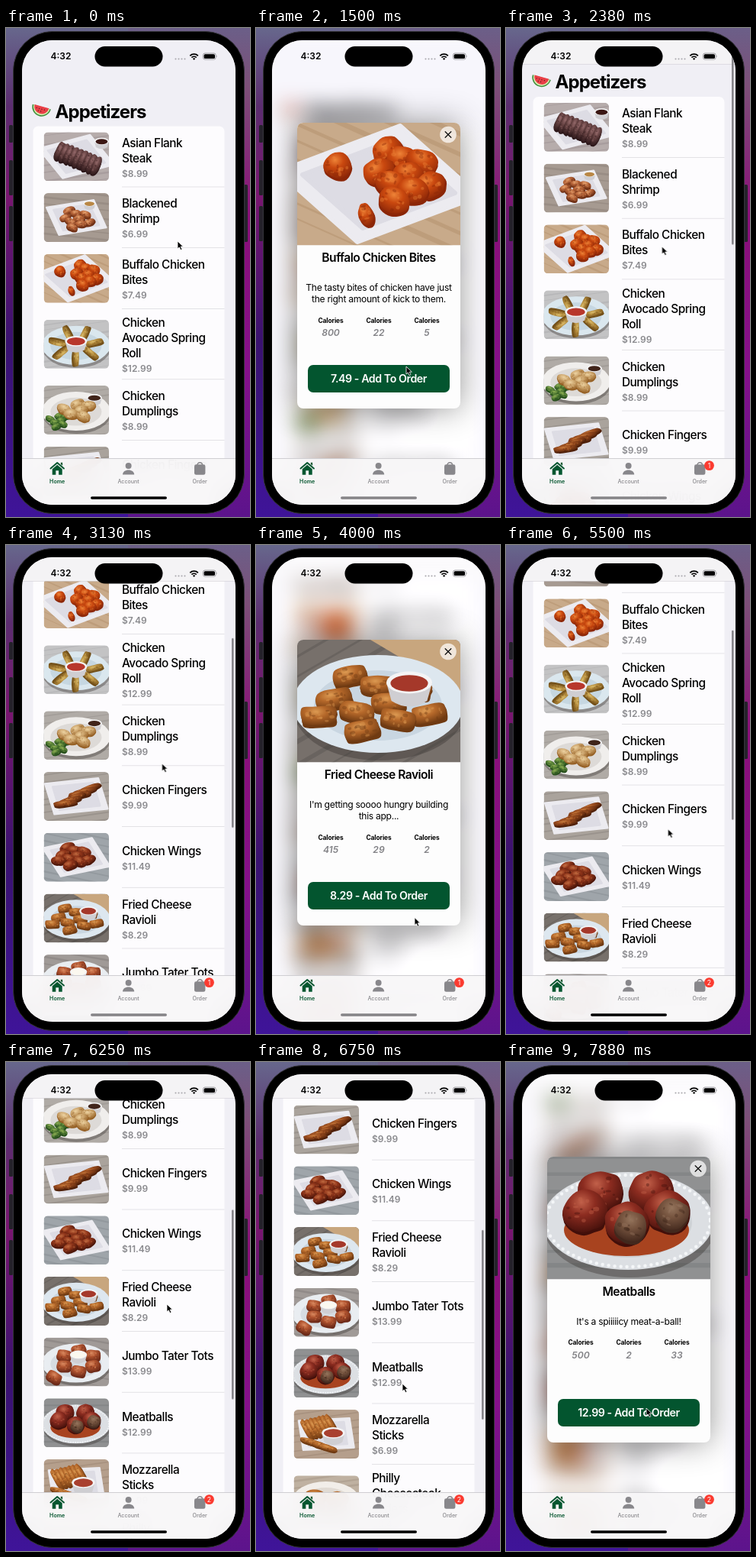
Write an HTML page that moves like this. It is 320 by 640 pixels and loops after 8000 ms.

```html
<!DOCTYPE html>
<html lang="en">
<head>
<meta charset="utf-8">
<title>Appetizers</title>
<style>
  @property --s { syntax: "<number>"; inherits: true; initial-value: 0; }
  html, body { margin: 0; width: 100%; height: 100%; overflow: hidden; }
  body {
    position: relative; font-family: Inter, Roboto, sans-serif; font-optical-sizing: none;
    background:
      linear-gradient(#67678c, #5c2d70 16%, #7a1670 34%, #3a1270 64%, #3f1499) 0 0 / 50% 100% no-repeat,
      linear-gradient(#6b5f88, #7d4f78 12%, #8a0f78 38%, #85108a 70%, #5c148c) 100% 0 / 50% 100% no-repeat;
  }
  svg { position: absolute; left: 0; top: 0; width: 320px; height: 640px; overflow: hidden; }
  .body { position: absolute; box-sizing: border-box; left: 8.5px; top: 3.5px; width: 304px; height: 632.5px;
    border-radius: 52px; background: #000; border: 1.5px solid #38373d; }
  .key { position: absolute; left: 4px; width: 5px; background: #25222b; border-radius: 1.5px; }
  .screen { position: absolute; left: 20.5px; top: 15.5px; width: 280.5px; height: 608px;
    border-radius: 40px; overflow: hidden; background: #f6f5f8; }
  .screen svg { left: -20.5px; top: -15.5px; }
  .tabs { position: absolute; left: 0; top: 547.5px; width: 100%; height: 61px;
    box-sizing: border-box; border-top: .7px solid #cfced2;
    background: rgba(248, 247, 248, .94); backdrop-filter: blur(14px); }

  .title { font-weight: 700; font-size: 24px; letter-spacing: -.04em; }
  .name { font-weight: 500; font-size: 15.4px; letter-spacing: -.033em; }
  .price { font-weight: 600; font-size: 12px; fill: #8a8a8e; }
  .mid, .tab, .count { text-anchor: middle; }
  .head { font-weight: 600; font-size: 15.6px; letter-spacing: -.034em; }
  .desc { font-size: 12.1px; letter-spacing: -.025em; }
  .label { font-weight: 700; font-size: 8.4px; letter-spacing: -.01em; }
  .value { font-weight: 600; font-size: 12.1px; font-style: italic; fill: #828286; }
  .add { font-weight: 600; font-size: 14.2px; letter-spacing: -.03em; fill: #fff; }
  .clock { font-weight: 600; font-size: 12px; }
  .tab { font-weight: 500; font-size: 7.1px; }
  .count { font-size: 8.6px; fill: #fff; }

  .home { animation: scroll 8s infinite, blur 8s step-end infinite; }
  .scroll { transform: translateY(calc(var(--s) * -1px)); }
  .nav { opacity: calc(var(--s) / 20); }
  .thumb { transform: translateY(calc(var(--s) * .4075px)); animation: thumb 8s infinite; }
  .card { opacity: 0; animation: 8s step-end infinite; }
  .card:nth-of-type(1) { animation-name: first; }
  .card:nth-of-type(2) { animation-name: second; }
  .card:nth-of-type(3) { animation-name: third; }
  .sheet { filter: drop-shadow(0 0 21px rgba(0, 0, 0, .42)); }
  .badge { animation: badge 8s step-end infinite; }
  .one { animation: one 8s step-end infinite; }
  .two { animation: two 8s step-end infinite; }
  .grip { animation: grip 8s step-end infinite; }
  .cursor { animation: cursor 8s ease-in-out infinite; }

  @keyframes scroll {
    0%, 27.5% { --s: 0; animation-timing-function: cubic-bezier(.3, 0, .4, 1); }
    39%, 41% { --s: 250.7; }
    46%, 67.5% { --s: 218; animation-timing-function: cubic-bezier(.3, 0, .7, .8); }
    78.125% { --s: 426; animation-timing-function: cubic-bezier(.2, .3, .5, 1); }
    84.375% { --s: 491.2; }
    87.5%, 100% { --s: 467; }
  }
  @keyframes blur {
    0%, 23.4375%, 65.625% { filter: none; }
    9.375%, 48.4375%, 87.5% { filter: blur(14px) brightness(1.03); }
  }
  @keyframes thumb {
    0%, 27.5%, 48.4%, 67.5%, 87.5%, 100% { opacity: 0; }
    28.5%, 46%, 68.5%, 86.5% { opacity: 1; }
  }
  @keyframes first { 0%, 23.4375% { opacity: 0; } 9.375% { opacity: 1; } }
  @keyframes second { 0%, 65.625% { opacity: 0; } 48.4375% { opacity: 1; } }
  @keyframes third { 0% { opacity: 0; } 87.5%, 100% { opacity: 1; } }
  @keyframes badge { 0% { opacity: 0; } 23.4375%, 100% { opacity: 1; } }
  @keyframes one { 0% { opacity: 1; } 65.625%, 100% { opacity: 0; } }
  @keyframes two { 0% { opacity: 0; } 65.625%, 100% { opacity: 1; } }
  @keyframes grip { 0%, 67.5%, 100% { fill: #000; } 9.375% { fill: #858487; } }
  @keyframes cursor {
    0% { transform: translate(225px, 279px); }
    6.5%, 9.375% { transform: translate(222px, 322px); }
    17.5%, 23.4375% { transform: translate(197px, 443px); }
    29%, 39.1% { transform: translate(204.5px, 286px); }
    46%, 48.4375% { transform: translate(207px, 490px); }
    55%, 65.625% { transform: translate(215px, 470px); }
    71%, 78.125% { transform: translate(211px, 317px); }
    84.375%, 88% { transform: translate(192px, 421px); }
    95%, 100% { transform: translate(184px, 453px); }
  }
</style>
</head>
<body>
<div class="key" style="top:127px;height:23px"></div>
<div class="key" style="top:173px;height:46px"></div>
<div class="key" style="top:233px;height:46px"></div>
<div class="key" style="left:312px;top:205px;height:75px"></div>
<div class="body"></div>
<div class="screen">
  <svg class="home">
    <defs id="photos"></defs>
    <rect x="-40" y="-40" width="400" height="720" fill="#f0eff5"/>
    <g class="scroll">
      <g transform="rotate(16 46 106)">
        <path d="M33.5 103a12.5 12.5 0 0 0 25 0z" fill="#3f8f3b"/>
        <path d="M35 103a11 11 0 0 0 22 0z" fill="#d8ebb0"/>
        <path d="M36.2 102.5a9.8 9.8 0 0 0 19.6 0z" fill="#ea3f47"/>
        <path d="M40 106h12M43 109h7" stroke="#471c1c" stroke-width="1.3" stroke-linecap="round" stroke-dasharray="0 3.5"/>
      </g>
      <text class="title" x="64.5" y="118">Appetizers</text>
      <g id="list"></g>
    </g>
    <g class="nav">
      <rect x="-40" y="-40" width="400" height="87" fill="#f4f3f5"/>
      <rect y="47" width="320" height=".6" fill="#d2d1d5"/>
    </g>
    <rect class="thumb" x="296" y="19.8" width="2.6" height="248" rx="1.3" fill="#858488"/>
  </svg>
  <svg id="cards"></svg>
  <div class="tabs"></div>
  <svg>
    <text class="clock" x="58.5" y="41">4:32</text>
    <rect x="116.5" y="24" width="89" height="26.5" rx="13.25"/>
    <path d="M222.5 40.5h14" stroke="#a9a8ad" stroke-width="2.1" stroke-linecap="round" stroke-dasharray="0 4"/>
    <path d="M241.3 36.3a7.6 7.6 0 0 1 10.6 0M243.4 38.6a4.6 4.6 0 0 1 6.4 0" fill="none" stroke="#000" stroke-width="1.8"/>
    <path d="M246.6 42l-1.7-1.9a2.6 2.6 0 0 1 3.4 0z"/>
    <rect x="258.4" y="33" width="16.8" height="8.2" rx="2.6" fill="none" stroke="#8c8b90" stroke-width=".8"/>
    <rect x="259.6" y="34.2" width="14.4" height="5.8" rx="1.6"/>
    <path d="M276.3 35.6q1.3 1.5 0 3z" fill="#8c8b90"/>

    <g fill="#05562f">
      <path d="M58.5 576.5l8.7-7.5 8.7 7.5" fill="none" stroke="#05562f" stroke-width="2" stroke-linecap="round" stroke-linejoin="round"/>
      <path d="M71.8 568.8h2.3v4l-2.3-2z"/>
      <path d="M60.7 577.3l6.5-5.6 6.5 5.6v7.5h-4.6v-5.5h-3.8v5.5h-4.6z"/>
      <text class="tab" x="67.2" y="596" style="font-weight:600">Home</text>
    </g>
    <g fill="#88878b">
      <circle cx="160.6" cy="573" r="4"/>
      <path d="M153 584.5c0-4 3.5-6.1 7.6-6.1s7.6 2.1 7.6 6.1z"/>
      <text class="tab" x="160.6" y="596">Account</text>
      <rect x="247" y="571.3" width="14.4" height="13.5" rx="2.4"/>
      <path d="M250.9 573v-1a3.3 3.3 0 0 1 6.6 0v1" fill="none" stroke="#88878b" stroke-width="1.4"/>
      <text class="tab" x="254.2" y="596">Order</text>
    </g>
    <g class="badge">
      <circle cx="266.5" cy="572.6" r="6.4" fill="#fb3b30"/>
      <text class="count one" x="266.4" y="575.7">1</text>
      <text class="count two" x="266.4" y="575.7">2</text>
    </g>
    <rect class="grip" x="111" y="613.3" width="100" height="3.5" rx="1.75"/>
  </svg>
</div>
<svg>
  <path class="cursor" d="M0 0v10l2.3-2.1 1.7 3.7 1.9-.9-1.7-3.6h3.2z" stroke="#fff" stroke-width=".8" stroke-linejoin="round"/>
</svg>

<script>
  let seed = 11;
  const rnd = () => (seed = seed * 16807 % 2147483647) / 2147483647;
  const byId = id => document.getElementById(id);
  const times = (n, fn) => Array.from({ length: n }, (_, i) => fn(i));
  const oval = (x, y, rx, ry, fill, o = 1) =>
    `<ellipse cx="${x}" cy="${y}" rx="${rx}" ry="${ry}" fill="${fill}" opacity="${o}"/>`;

  // shadow, body, highlight
  const tones = {
    steak: ['#2b1618', '#634040', '#94696a'],
    shrimp: ['#6e2f14', '#b9663a', '#e6a470'],
    spicy: ['#8b2607', '#c9480f', '#ee8438'],
    roll: ['#735019', '#b38a3c', '#dbbd6c'],
    dough: ['#966126', '#cda66e', '#edd3a2'],
    leaf: ['#274f1c', '#557f36', '#8fae54'],
    brown: ['#4f2009', '#96491d', '#c97c3c'],
    wing: ['#4e170a', '#8e3419', '#c06a40'],
    gold: ['#6f3a12', '#b5682a', '#dc9a52'],
    tot: ['#6d2a18', '#b0532f', '#da8a60'],
    meat: ['#420f0a', '#8c2c20', '#c2614a'],
    crumb: ['#42281d', '#76543f', '#94745c']
  };
  const shades = Object.entries(tones).map(([id, [dark, mid, light]]) =>
    `<radialGradient id="${id}" cx=".42" cy=".3" r=".75"><stop stop-color="${light}"/><stop offset=".4" stop-color="${mid}"/><stop offset="1" stop-color="${dark}"/></radialGradient>`).join('');

  // Table top with faint planks
  const table = (base, line, tilt = -8) => `<rect width="214" height="161" fill="${base}"/>` +
    times(9, i => `<rect x="-60" y="${i * 24 - 30 + rnd() * 8}" width="330" height="${2 + rnd() * 5}" fill="${line}" opacity=".35" transform="rotate(${tilt} 107 80)"/>`).join('');

  const plate = (rim, well) => oval(108, 92, 112, 66, '#3b3634', .4) + oval(106, 84, 112, 64, rim) + oval(106, 86, 84, 46, well);
  const bowl = (x, y, r, sauce) =>
    `<path d="M${x - r} ${y}l${r * .22} ${r * .8}q${r * .78} ${r * .5} ${r * 1.56} 0l${r * .22}-${r * .8}z" fill="#cfced2"/>` +
    oval(x, y, r, r * .48, '#f4f4f5') + oval(x, y + 1, r * .82, r * .36, sauce);

  // Square dish seen at a slant
  function tray(turn, size = 1) {
    const square = (k, fill) => {
      const pts = times(4, i => {
        const t = (turn + i * 90) * Math.PI / 180;
        return [107 + Math.cos(t) * 132 * k, 80 + Math.sin(t) * 76 * k].map(Math.round);
      });
      return `<polygon points="${pts}" fill="${fill}" stroke="${fill}" stroke-width="6" stroke-linejoin="round"/>`;
    };
    return square(size, '#ecebf0') + square(size * .76, '#dddce4');
  }

  // Piece of food: a rough superellipse, squarer as p grows
  function lump(x, y, rx, ry, turn, tone, p = 2) {
    const n = 16, [dark, , light] = tones[tone];
    const pts = times(n, i => {
      const c = Math.cos(i / n * 2 * Math.PI), s = Math.sin(i / n * 2 * Math.PI);
      const k = (Math.abs(c) ** p + Math.abs(s) ** p) ** (-1 / p) * (.93 + rnd() * .16);
      return [c * rx * k, s * ry * k];
    });
    const half = i => pts[i % n].map((v, j) => ((v + pts[(i + 1) % n][j]) / 2).toFixed(1));
    const d = 'M' + half(0) + times(n, i => `Q${pts[(i + 1) % n].map(v => v.toFixed(1))} ${half(i + 1)}`).join('');
    const flecks = times(14, () => {
      const t = rnd() * 6.28, r = Math.sqrt(rnd()) * .8;
      return oval((Math.cos(t) * r * rx).toFixed(1), (Math.sin(t) * r * ry).toFixed(1), 1 + rnd() * 3, 1 + rnd() * 2, rnd() < .5 ? light : dark, .4);
    }).join('');
    return `<g transform="translate(${x.toFixed(1)} ${y.toFixed(1)}) rotate(${turn})"><path d="${d}" fill="${dark}" transform="translate(1 4)"/><path d="${d}" fill="url(#${tone})"/>${flecks}</g>`;
  }

  // Layouts, drawn from back to front
  const place = (pts, fn) => pts.sort((a, b) => a[1] - b[1]).map(([x, y, t], i) => fn(x, y, i, t)).join('');
  const heap = (n, x, y, rx, ry, fn) => place(times(n, i => {
    const t = i * 2.4, r = Math.sqrt((i + .5) / n);
    return [x + Math.cos(t) * rx * r, y + Math.sin(t) * ry * r];
  }), fn);
  const ring = (n, x, y, rx, ry, fn) => place(times(n, i => {
    const t = Math.PI / 2 + i / n * 2 * Math.PI;
    return [x + Math.cos(t) * rx, y + Math.sin(t) * ry, t * 180 / Math.PI];
  }), fn);
  const line = (n, x, y, dx, dy, fn) => times(n, i => fn(x + i * dx, y + i * dy, i)).join('');
  const sway = i => (i % 3 - 1) * 22;

  const pictures = {
    'Asian Flank|Steak': () => table('#b6acab', '#8d8283') + tray(20) + bowl(190, 30, 24, '#3a1613') +
      line(9, 52, 62, 15, 6, (x, y) => lump(x, y, 13, 32, 24, 'steak', 3)),
    'Blackened|Shrimp': () => table('#a69a91', '#81756d', 6) + tray(30, .86) + bowl(150, 34, 20, '#b98745') +
      heap(9, 104, 84, 50, 34, (x, y, i) => lump(x, y, 20, 11, sway(i), 'shrimp')),
    'Buffalo Chicken|Bites': () => table('#c8aa8a', '#a9855f', 24) + tray(102, 1.02) + lump(53, 56, 18, 17, 0, 'spicy') +
      lump(90, 120, 10, 15, -14, 'spicy') + heap(9, 136, 68, 42, 40, (x, y, i) => lump(x, y, 21, 17, sway(i), 'spicy')),
    'Chicken|Avocado Spring|Roll': () => table('#c3c3c4', '#a0a1a3') + plate('#dae7ee', '#c6d7e1') +
      ring(7, 106, 84, 62, 40, (x, y, i, t) => lump(x, y, 30, 10, t, 'roll', 4)) + bowl(106, 70, 36, '#b8372c'),
    'Chicken|Dumplings': () => table('#b0aba6', '#898480') + plate('#f0eeec', '#dddad7') + bowl(166, 40, 25, '#40241a') +
      heap(7, 48, 112, 34, 24, (x, y, i) => lump(x, y, 16, 9, sway(i), 'leaf')) +
      heap(6, 108, 82, 48, 32, (x, y, i) => lump(x, y, 25, 16, sway(i), 'dough')),
    'Chicken Fingers': () => table('#aaa39c', '#7c7671') + tray(35, .95) +
      line(6, 150, 54, -16, 10, (x, y, i) => lump(x, y, 38, 10, -14 + sway(i) / 3, 'brown', 3)),
    'Chicken Wings': () => table('#9fa5aa', '#7b8187', 12) + tray(25, .92) +
      heap(10, 98, 76, 54, 38, (x, y, i) => lump(x, y, 25, 15, sway(i), 'wing')),
    'Fried Cheese|Ravioli': () => table('#77706b', '#4f4a48', -30) + '<path d="M96 0h118v70z" fill="#c8a67e"/>' + plate('#dde7ef', '#c9d6e1') +
      heap(10, 102, 82, 82, 46, (x, y, i) => lump(x, y, 23, 12, sway(i) / 2, 'gold', 7)) + bowl(147, 56, 30, '#a5382a'),
    'Jumbo Tater Tots': () => table('#a09a97', '#77716d', 10) + plate('#e9edf1', '#d6dce2') + lump(34, 130, 26, 18, 30, 'tot', 4) +
      ring(6, 114, 76, 54, 34, (x, y, i) => lump(x, y, 24, 18, sway(i) / 2, 'tot', 5)) + bowl(114, 56, 28, '#fbf8ef'),
    'Meatballs': () => table('#909192', '#6d7072', 0) + plate('#dcdfe3', '#ced2d6') +
      '<ellipse cx="106" cy="84" rx="108" ry="60" fill="none" stroke="#f4f6f8" stroke-width="4.5" stroke-linecap="round" stroke-dasharray="0 8"/>' +
      oval(104, 96, 82, 34, '#a8431f') + ring(5, 104, 64, 57, 23, (x, y) => lump(x, y, 30, 27, 0, 'meat') +
        (x > 100 && y > 60 ? lump(x + 6, y + 4, 20, 20, 20, 'crumb', 3) : '')),
    'Mozzarella|Sticks': () => table('#b59f8c', '#8f7a68') + tray(40, .9) +
      line(7, 44, 66, 13, -3, (x, y) => lump(x, y, 10, 36, -30, 'gold', 4)) +
      line(4, 52, 104, 20, 7, (x, y) => lump(x, y, 31, 9, 16, 'gold', 4)) + bowl(130, 76, 38, '#a9402f'),
    'Philly|Cheesesteak|Sliders': () => table('#bfb1a1', '#998a7a') + plate('#f2eee9', '#e1dbd4') +
      line(2, 70, 72, 72, 4, (x, y) => lump(x, y + 28, 34, 14, 0, 'crumb') + lump(x, y, 38, 25, 0, 'gold'))
  };
  const prices = [8.99, 6.99, 7.49, 12.99, 8.99, 9.99, 11.49, 8.29, 13.99, 12.99, 6.99, 9.49];
  const names = Object.keys(pictures);
  byId('photos').innerHTML = shades + names.map((name, i) =>
    `<symbol id="p${i}" viewBox="0 0 214 160.5" preserveAspectRatio="none">${pictures[name]()}</symbol>`).join('') +
    '<clipPath id="round"><rect width="85.5" height="64" rx="5.5"/></clipPath>';

  let y = 128.5;
  const rows = names.map((name, i) => {
    const lines = name.split('|'), n = lines.length, h = n > 2 ? 92.4 : 79.72;
    const base = h / 2 + 7.2 - n * 10;
    const row = `<g transform="translate(0 ${y})">
      <g transform="translate(49.5 ${h / 2 - 32})" clip-path="url(#round)"><use href="#p${i}" width="85.5" height="64"/></g>
      ${lines.map((t, k) => `<text class="name" x="152" y="${base + k * 20}">${t}</text>`).join('')}
      <text class="price" x="152" y="${base + n * 20 - 1}">$${prices[i]}</text>
      <rect x="152" y="${h - .6}" width="134.5" height=".7" fill="#d8d7dc"/></g>`;
    y += h;
    return row;
  }).join('');
  byId('list').innerHTML = `<rect x="35.5" y="128.5" width="251" height="${y - 128.5}" rx="7" fill="#fdfcfe"/>` + rows;

  const cards = [
    [2, 'The tasty bites of chicken have just|the right amount of kick to them.', [800, 22, 5]],
    [7, "I'm getting soooo hungry building|this app...", [415, 29, 2]],
    [9, "It's a spiiiiicy meat-a-ball!", [500, 2, 33]]
  ];
  const mid = (cls, x, y, t) => `<text class="mid ${cls}" x="${x}" y="${y}">${t}</text>`;
  byId('cards').innerHTML = '<clipPath id="top"><path d="M54 284.5V132a8 8 0 0 1 8-8h198a8 8 0 0 1 8 8v152.5z"/></clipPath>' +
    cards.map(([i, desc, facts]) => {
      const lines = desc.split('|'), end = 343.5 + lines.length * 15.7;
      return `<g class="card">
      <rect class="sheet" x="54" y="124" width="214" height="374" rx="8" fill="#fdfdfd"/>
      <g clip-path="url(#top)"><use href="#p${i}" x="54" y="124" width="214" height="160.5"/></g>
      <circle cx="252" cy="139.5" r="10.8" fill="#fff" opacity=".72"/>
      <path d="M248.2 135.7l7.6 7.6m0-7.6l-7.6 7.6" stroke="#111" stroke-width="1.3" stroke-linecap="round"/>
      ${mid('head', 161, 305.5, names[i].replace('|', ' '))}
      ${lines.map((t, k) => mid('desc', 161, 343.5 + k * 15.7, t)).join('')}
      ${facts.map((v, k) => mid('label', 98 + k * 63, end + 11, 'Calories') + mid('value', 98 + k * 63, end + 28.5, v)).join('')}
      <rect x="68" y="441" width="186" height="36" rx="7" fill="#03552f"/>
      ${mid('add', 161, 464, prices[i] + ' - Add To Order')}</g>`;
    }).join('');
</script>
</body>
</html>
```
